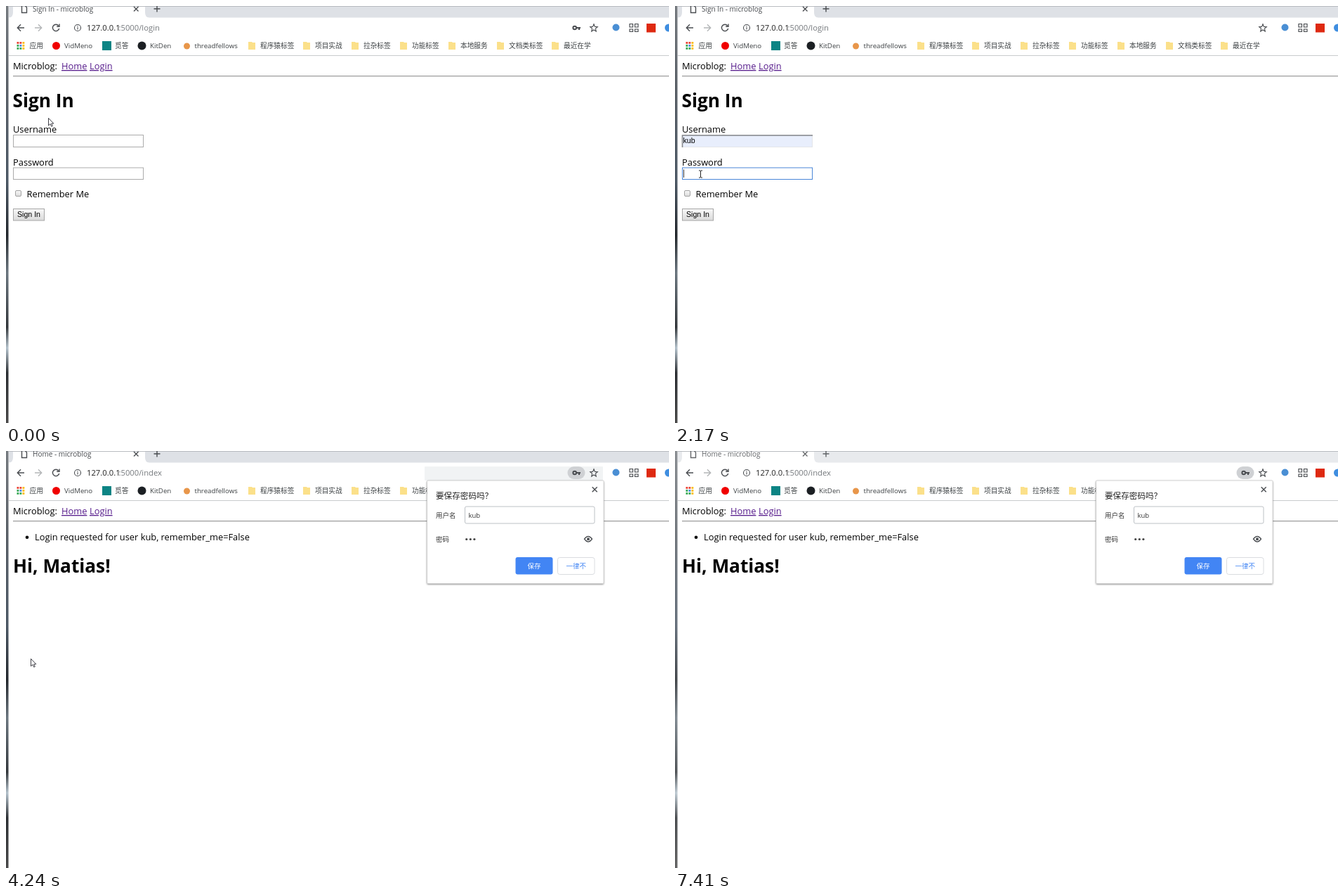
An HTML page for the animation above (7510 ms loop, 944 px wide and 593 px high).

```html
<!DOCTYPE html>
<html lang="zh-CN">
<head>
<meta charset="utf-8">
<title>Sign In</title>
<style>
  html, body { margin: 0; width: 100%; height: 100%; overflow: hidden; background: #fff; }
  svg { display: block; width: 944px; height: 593px; }
  text { font-family: "Open Sans", "Noto Sans CJK SC", "Noto Sans CJK", sans-serif; font-size: 12.85px; fill: #000; }
  .h1 { font-size: 26.2px; font-weight: 700; }
  .link { fill: #551a8b; text-decoration: underline; }
  .tab { font-size: 10px; fill: #4a4d51; }
  .url { font-size: 11.25px; fill: #222; }
  .path { fill: #74787c; }
  .mark { font-size: 9.7px; fill: #3c4043; }
  .form { font-family: "Liberation Sans", Arial, sans-serif; font-size: 10.6px; }
  .item { font-size: 10.35px; fill: #222; }
  .small { font-size: 9.5px; fill: #333; }
  .line { fill: none; stroke: #4a4d51; stroke-width: 1.4; }
</style>
</head>
<body>
<svg viewBox="0 0 944 593">
  <defs>
    <linearGradient id="desk" x2="0" y2="1">
      <stop offset="0" stop-color="#767b80"/>
      <stop offset=".2" stop-color="#5a6067"/>
      <stop offset=".42" stop-color="#4d5966"/>
      <stop offset=".55" stop-color="#24282d"/>
      <stop offset=".64" stop-color="#6c7780"/>
      <stop offset=".77" stop-color="#34383c"/>
      <stop offset=".82" stop-color="#b4c2cc"/>
      <stop offset=".88" stop-color="#2c2f33"/>
      <stop offset="1" stop-color="#4a4a4a"/>
    </linearGradient>
    <linearGradient id="face" x2="0" y2="1">
      <stop offset="0" stop-color="#f8f8f8"/><stop offset="1" stop-color="#dadada"/>
    </linearGradient>
    <filter id="shade" x="-10%" y="-10%" width="120%" height="125%">
      <feDropShadow dx="0" dy="1" stdDeviation="1.2" flood-opacity=".45"/>
    </filter>
  </defs>
  <rect width="944" height="593" fill="#fff"/>

  <!-- tab strip -->
  <path id="strip" d="M4 0H10V9Q10 16.500 4 16.500ZM198 0H944V16.500H204Q198 16.500 198 9Z"/>
  <path d="M4 .5H944" stroke="#b9bcc1"/>
  <g id="tabInk">
    <path d="M22.500 0V9.500H29.500V2L27.500 0" class="line" stroke-width="1"/>
    <text id="tab" class="tab" x="38" y="8"></text>
    <path d="M182 1L188.500 7.500M188.500 1L182 7.500" class="line"/>
    <path d="M210.500 4H219.500M215 0V8.500" class="line" stroke-width="1.6"/>
  </g>

  <!-- toolbar -->
  <path d="M26 31H16.500M21 26.300L16.300 31L21 35.700" class="line"/>
  <path d="M41 31H50.500M46 26.300L50.700 31L46 35.700" class="line" style="stroke:#b4b6b8"/>
  <path d="M74.800 28A4.700 4.700 0 1 0 75.700 32M76 25.500V29.300H72.200" class="line"/>
  <circle cx="102" cy="31" r="4.500" class="line" style="stroke-width:1.100"/>
  <path d="M102 30.300V33.500M102 28.300V29.400" class="line" style="stroke-width:1.100"/>
  <rect id="bar" x="596" y="22" width="254" height="20" rx="1" fill="#f1f3f4"/>
  <text class="url" x="115" y="35">127.0.0.1</text>
  <text id="path" class="url path" x="160.500" y="35"></text>
  <g id="key">
    <rect id="keyPill" x="799.500" y="22" width="25" height="18" rx="9" fill="#cfd1d4"/>
    <circle cx="809.700" cy="31" r="2.300" fill="none" stroke="#4a4d51" stroke-width="2"/>
    <path d="M812 31H818M816 31V34" stroke="#4a4d51" stroke-width="2.200"/>
  </g>
  <path d="M837 25.800L838.500 29.400L842.300 29.700L839.400 32.200L840.300 36L837 34L833.700 36L834.600 32.200L831.700 29.700L835.500 29.400Z" class="line" style="stroke-width:1.100"/>
  <circle cx="868.500" cy="30.500" r="5" fill="#4a8fd4"/>
  <path d="M888 25.500H892.500V30H888ZM895.500 25.500H900V30H895.500ZM888 33H892.500V36.500H888ZM895.500 33H900V36.500H895.500Z" class="line" style="stroke-width:1.200"/>
  <rect x="912" y="25" width="13" height="12.500" fill="#de2910"/>
  <circle cx="943.500" cy="31" r="5.500" fill="#3f8ee0"/>

  <!-- bookmarks -->
  <g id="apps"></g>
  <text class="mark" x="33.500" y="60">应用</text>
  <circle cx="71.500" cy="56.500" r="5.500" fill="#f00000"/>
  <text class="mark" x="83" y="60">VidMeno</text>
  <rect x="137" y="50" width="13" height="13" fill="#0c8484"/>
  <text class="mark" x="155" y="60">觅答</text>
  <circle cx="193.500" cy="56.500" r="6" fill="#1b1f23"/>
  <text class="mark" x="205" y="60">KitDen</text>
  <circle cx="257.500" cy="57" r="4.500" fill="#e8964a"/>
  <text class="mark" x="268.500" y="60">threadfellows</text>
  <g id="folders"></g>
  <path d="M4 70.500H944" stroke="#c9cbcd"/>

  <!-- page -->
  <text x="10" y="90">Microblog:</text>
  <text class="link" x="79" y="90">Home</text>
  <text class="link" x="119" y="90">Login</text>
  <path d="M10 99.500H944" stroke="#9c9c9c"/><path d="M10 100.500H944" stroke="#e6e6e6"/>

  <g id="login">
    <text class="h1" x="9.500" y="144">Sign In</text>
    <text x="10" y="180">Username</text>
    <rect id="user" x="10.500" y="183.500" width="185" height="17"/>
    <path id="inset" d="M10.500 201V184H196" fill="none" stroke="#85878a" stroke-width="1.600"/>
    <text id="userText" class="form" x="11.500" y="195"></text>
    <path id="userCaret" d="M12 186V198" stroke="#222"/>
    <text x="10" y="226.500">Password</text>
    <rect id="pass" x="10.500" y="230" width="185" height="16.500" fill="#fff"/>
    <g id="dots"></g>
    <path id="passCaret" d="M0 232.500V244" stroke="#333"/>
    <rect x="13.500" y="262.500" width="8" height="8" rx="1.500" fill="url(#face)" stroke="#a3a3a3"/>
    <text x="29.500" y="272">Remember Me</text>
    <rect id="button" x="10.500" y="288.500" width="44" height="16.500" fill="url(#face)"/>
    <text class="form" x="16" y="299.800">Sign In</text>
    <g id="list">
      <path d="M9.500 202H196V380Q196 383 193 383H12.500Q9.500 383 9.500 380Z" fill="#fff" filter="url(#shade)"/>
      <rect id="hover" x="9.500" width="186.500" height="28" fill="#e8e9eb"/>
      <g id="items"></g>
    </g>
  </g>

  <g id="home">
    <circle cx="30" cy="122.800" r="2.300"/>
    <text x="41" y="127">Login requested for user kub, remember_me=False</text>
    <text class="h1" x="10" y="172.500">Hi, Matias!</text>
    <g id="popup">
      <rect x="599.500" y="42" width="251.500" height="146.500" rx="1.500" fill="#fff" stroke="#bbb" stroke-width=".6" filter="url(#shade)"/>
      <path d="M834.700 51.200L841.700 58.200M841.700 51.200L834.700 58.200" class="line"/>
      <text x="612" y="68" style="font-size:11.600px;fill:#222">要保存密码吗？</text>
      <text class="small" x="612" y="94.500">用户名</text>
      <rect x="653.500" y="79" width="184.500" height="24" rx="2" fill="#fff" stroke="#bdc1c6"/>
      <text class="small" x="658.500" y="94.500">kub</text>
      <text class="small" x="612" y="129">密码</text>
      <g fill="#444"><circle cx="655.700" cy="125.500" r="1.600"/><circle cx="661.300" cy="125.500" r="1.600"/><circle cx="666.900" cy="125.500" r="1.600"/></g>
      <path d="M823.500 125.200Q829 117.500 834.500 125.200Q829 133 823.500 125.200Z" class="line"/>
      <circle cx="829" cy="125.200" r="2" fill="#4a4d51"/>
      <rect x="725.500" y="151" width="53" height="24.500" rx="3" fill="#4285f4"/>
      <text class="small" x="752" y="167" text-anchor="middle" style="fill:#fff">保存</text>
      <rect x="785.500" y="151.500" width="52.500" height="24" rx="3" fill="#fff" stroke="#dadce0"/>
      <text class="small" x="811.700" y="167" text-anchor="middle" style="fill:#4285f4">一律不</text>
    </g>
  </g>

  <rect id="edge" width="3.500" height="593" fill="url(#desk)"/>

  <path id="arrow" d="M.5 .5V11L3 8.700L4.700 12.300L6.300 11.600L4.700 8.100H7.800Z" fill="#fff" stroke="#2b2b33" stroke-width=".9"/>
  <path id="beam" d="M-2.500 -5H-.5L0 -4.500L.5 -5H2.500M0 -4.500V4.500M-2.500 5H-.5L0 4.500L.5 5H2.500" fill="none" stroke="#222"/>
</svg>

<script>
const LOOP = 7510;
const NAMES = ['lubei', 'novaqqliang', 'kub', '789', '12000345678', 'sefsef'];
const FOLDERS = { 345: '程序猿标签', 423: '项目实战', 492: '拉杂标签', 561: '功能标签', 630: '本地服务', 699: '文档类标签', 777: '最近在学' };
const $ = id => document.getElementById(id);

function add(parent, tag, attrs, text = '') {
  const el = document.createElementNS(parent.namespaceURI, tag);
  for (const k in attrs) el.setAttribute(k, attrs[k]);
  el.textContent = text;
  return parent.appendChild(el);
}

const R = '#ea4335', Y = '#fbbc04', G = '#34a853', B = '#4285f4';
[R, R, Y, G, B, Y, G, G, Y].forEach((fill, i) =>
  add($('apps'), 'rect', { x: 15.5 + i % 3 * 4, y: 51 + (i / 3 | 0) * 4, width: 2.8, height: 2.8, fill }));
for (const x in FOLDERS) {
  add($('folders'), 'path', { d: `M${x} 51H${+x + 5}L${+x + 6} 52H${+x + 10}V62H${x}Z`, fill: '#fbe08a' });
  add($('folders'), 'text', { class: 'mark', x: +x + 17, y: 60 }, FOLDERS[x]);
}
NAMES.forEach((name, i) => add($('items'), 'text', { class: 'item', x: 19, y: 225.5 + 28 * i }, name));
for (let i = 0; i < 3; i++) add($('dots'), 'circle', { cx: 13.7 + 3.6 * i, cy: 237.2, r: 1.4 });

// Pointer steps: time, x, y, shape
const POINTER = [
  [0, 60, 159, 'arrow'], [120, 53, 170, 'arrow'], [240, 44, 190, 'beam'], [350, 36, 193, 'beam'],
  [710, 34, 216, 'arrow'], [830, 33, 246, 'arrow'], [950, 32, 277, 'arrow'],
  [1320, 34, 262, 'arrow'], [1440, 35, 242, 'beam'], [2170, 36.5, 239, 'beam'], [2540, 0, 0, ''],
  [3030, 36.5, 240, 'beam'], [3150, 37, 258, 'arrow'], [3270, 37, 276, 'arrow'], [3390, 36, 291, 'arrow'],
  [3510, 35, 294, 'arrow'], [3630, 35, 295, 'arrow'], [4980, 38, 293, 'arrow'], [5100, 39, 293, 'arrow'],
  [5590, 41, 292, 'arrow'], [5710, 60, 262, 'arrow'], [5830, 88, 215, 'arrow'], [5950, 115, 184, 'arrow'],
  [6070, 135, 132, 'arrow'], [6190, 144, 122, 'arrow'], [6310, 138, 175, 'beam'],
  [6430, 210, 225, 'arrow'], [6550, 420, 340, 'arrow'], [6670, 650, 455, 'arrow'], [6790, 921, 580, 'arrow'],
  [6910, 0, 0, '']
];

// State changes: time, changed values
const STEPS = [
  [0, { focus: '', open: false, hover: -1, user: '', key: true, dots: 0, caret: false, press: 0, home: false, popup: 0, blur: false }],
  [350, { focus: 'user' }],
  [460, { open: true }],
  [710, { hover: 0, user: NAMES[0] }],
  [830, { hover: 1, user: NAMES[1] }],
  [950, { hover: 2, user: NAMES[2] }],
  [1200, { open: false, key: false }],
  [1680, { focus: 'pass', caret: true }],
  [2290, { caret: false }],
  [2540, { dots: 1, caret: true, key: true }],
  [2790, { dots: 2 }],
  [2910, { dots: 3 }],
  [3510, { caret: false }],
  [3880, { press: 1 }],
  [4000, { home: true }],
  [4120, { popup: 0.5 }],
  [4240, { popup: 1 }],
  [7410, { blur: true }]
];

const show = (id, on) => $(id).style.display = on ? '' : 'none';
const set = (id, attrs) => { for (const k in attrs) $(id).setAttribute(k, attrs[k]); };
const label = (id, text) => { if ($(id).textContent !== text) $(id).textContent = text; };

function draw(t) {
  const s = Object.assign({}, ...STEPS.filter(step => step[0] <= t).map(step => step[1]));
  const [, x, y, shape] = POINTER.filter(p => p[0] <= t).pop();
  for (const id of ['arrow', 'beam']) {
    show(id, id === shape);
    set(id, { transform: `translate(${x} ${y})` });
  }

  label('tab', s.home ? 'Home - microblog' : 'Sign In - microblog');
  label('path', s.home ? ':5000/index' : ':5000/login');
  show('login', !s.home);
  show('home', s.home);
  show('popup', s.popup);
  set('popup', { opacity: s.popup });
  show('key', s.key);
  show('keyPill', s.popup);
  show('bar', s.popup && !s.blur);
  set('strip', { fill: s.blur ? '#e8eaed' : '#dee1e6' });
  set('tabInk', { opacity: s.blur ? 0.85 : 1 });
  set('edge', { opacity: s.blur ? 0.85 : 1 });

  const filled = s.user !== '', onUser = s.focus === 'user';
  set('user', {
    fill: filled ? '#e8eefc' : '#fff',
    stroke: onUser ? '#5b8fe0' : filled ? '#e4e6ea' : '#ababab'
  });
  show('inset', filled);
  label('userText', s.user);
  show('userCaret', onUser);
  set('pass', { stroke: s.focus === 'pass' ? '#4a86d8' : '#ababab' });
  [...$('dots').children].forEach((dot, i) => dot.style.display = i < s.dots ? '' : 'none');
  show('passCaret', s.caret);
  set('passCaret', { transform: `translate(${12.5 + 3.6 * s.dots} 0)` });
  set('button', { fill: s.press ? '#d4d4d4' : 'url(#face)', stroke: y > 288 && t > 3300 ? '#8c8c8c' : '#a6a6a6' });
  show('list', s.open);
  show('hover', s.hover >= 0);
  set('hover', { y: 208 + 28 * s.hover });
}

const start = performance.now();
function tick() {
  draw((performance.now() - start) % LOOP);
  requestAnimationFrame(tick);
}
tick();
</script>
</body>
</html>
```
